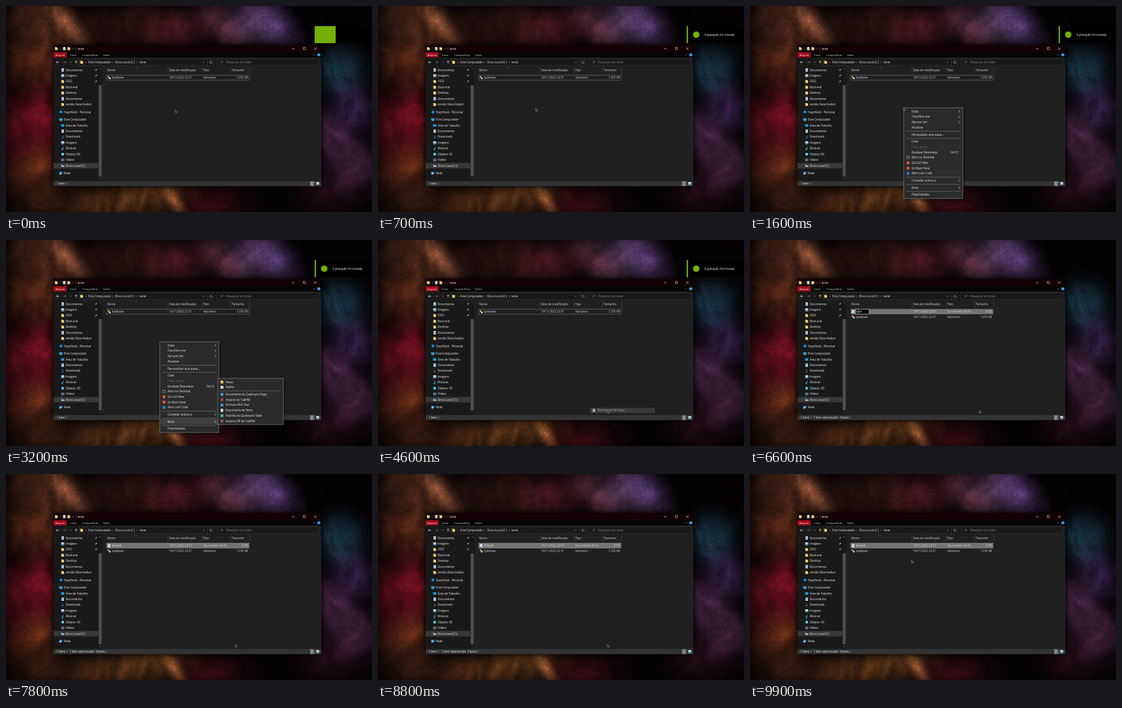
Write an HTML page with a canvas that moves like this. It is 600 px wide and 338 px high and loops after 10 s.

```html
<!DOCTYPE html>
<html lang="pt-BR">
<head>
<meta charset="utf-8">
<style>
html, body { margin: 0; width: 100%; height: 100%; overflow: hidden; background: #000; }
canvas { display: block; }
</style>
</head>
<body>
<canvas id="stage" width="600" height="338"></canvas>
<script>
const W = 600, H = 338, LOOP = 10000;
const stage = document.getElementById('stage').getContext('2d');
let g = stage;

// ---------- drawing helpers ----------
function rect(x, y, w, h, color) {
  g.fillStyle = color;
  g.fillRect(x, y, w, h);
}
function frame(x, y, w, h, color, line = 0.6) {
  g.strokeStyle = color;
  g.lineWidth = line;
  g.strokeRect(x, y, w, h);
}
function disc(x, y, r, color) {
  g.fillStyle = color;
  g.beginPath();
  g.arc(x, y, r, 0, 7);
  g.fill();
}
function path(points, color, line = 0.6) {
  g.strokeStyle = color;
  g.lineWidth = line;
  g.beginPath();
  points.forEach(([x, y]) => g.lineTo(x, y));
  g.stroke();
}
// Large font scaled down keeps letter spacing fractional.
function text(s, x, y, color = '#f2f2f2', align = 'left', size = 4.6) {
  g.save();
  g.translate(x, y + 1.6);
  g.scale(0.1, 0.1);
  g.font = `${size * 10}px "Open Sans", "Noto Sans", sans-serif`;
  g.textAlign = align;
  g.fillStyle = color;
  g.fillText(s, 0, 0);
  g.restore();
}
function chevron(x, y, dir, color = '#bbb', s = 1.6) {
  const turn = { right: 0, down: 1, left: 2, up: 3 }[dir] * Math.PI / 2;
  g.save();
  g.translate(x, y);
  g.rotate(turn);
  path([[-s / 2, -s], [s / 2, 0], [-s / 2, s]], color, 0.6);
  g.restore();
}
function arrow(x, y, dir, color) {
  const turn = { right: 0, left: Math.PI, up: -Math.PI / 2, down: Math.PI / 2 }[dir];
  g.save();
  g.translate(x, y);
  g.rotate(turn);
  path([[-2.3, 0], [2.3, 0]], color, 0.7);
  path([[0.4, -1.9], [2.3, 0], [0.4, 1.9]], color, 0.7);
  g.restore();
}

const square = color => (x, y) => rect(x - 2.2, y - 2.2, 4.4, 4.4, color);
const icons = {
  folder(x, y) {
    rect(x - 2.2, y - 2.6, 2.4, 2, '#e0a93a');
    rect(x - 2.2, y - 1.9, 4.4, 4.3, '#f8d272');
  },
  doc(x, y) {
    rect(x - 2, y - 2.6, 4, 5.2, '#e8eaec');
    [-1, 0.2, 1.4].forEach(d => rect(x - 1.2, y + d, 2.4, 0.4, '#7b8894'));
  },
  page(x, y) {
    icons.doc(x, y);
    rect(x - 1.2, y - 1, 2.4, 2, '#4b9fdc');
  },
  picture(x, y) {
    rect(x - 2.4, y - 2.2, 4.8, 4.4, '#e3eef5');
    rect(x - 1.8, y, 3.6, 1.6, '#2f8fc5');
  },
  computer(x, y) {
    rect(x - 2.7, y - 2.2, 5.4, 3.5, '#35a7e8');
    rect(x - 1.5, y + 1.8, 3, 0.7, '#b8c6d0');
  },
  desk(x, y) { rect(x - 2.5, y - 2, 5, 4, '#1f9ee6'); },
  download(x, y) { arrow(x, y, 'down', '#31aef2'); },
  music(x, y) {
    disc(x - 0.8, y + 1.5, 1.2, '#31aef2');
    path([[x + 0.2, y + 1.5], [x + 0.2, y - 2.4], [x + 1.8, y - 1]], '#31aef2', 0.8);
  },
  cube(x, y) {
    rect(x - 2.1, y - 2.1, 4.2, 4.2, '#35b8d8');
    rect(x - 0.9, y - 0.9, 1.8, 1.8, '#b4ecf5');
  },
  video(x, y) {
    rect(x - 2.4, y - 2, 4.8, 4, '#8d99a8');
    rect(x - 1.4, y - 1.5, 2.8, 3, '#3c5b8c');
  },
  drive(x, y) {
    rect(x - 2.5, y - 0.3, 5.2, 2.1, '#c8ced4');
    rect(x - 2.5, y - 2.1, 2.2, 1.6, '#31aef2');
  },
  network(x, y) {
    rect(x - 2.5, y - 2, 4.8, 3.4, '#3aa4e0');
    disc(x - 1, y + 1.2, 1.3, '#9bd4f5');
  },
  shortcut(x, y) {
    rect(x - 2.3, y - 2.3, 4.6, 4.6, '#f0f0f0');
    path([[x - 1, y + 1.2], [x + 1.1, y - 1]], '#1c6fc4', 0.9);
  },
  program(x, y) {
    rect(x - 2, y - 2.5, 2.2, 2.6, '#e9c83f');
    rect(x - 0.2, y - 0.1, 2.8, 2.4, '#dfe5ea');
  },
  terminal(x, y) {
    rect(x - 2.4, y - 2, 4.8, 4, '#d8d8d8');
    rect(x - 2, y - 1.2, 4, 2.8, '#222');
  },
  orange: square('#e8603c'),
  blue: square('#1f8ad2'),
  navy: square('#4d9be0'),
  green: square('#54b4c8'),
  plum: square('#a2554e'),
  cloud(x, y) { disc(x, y, 2.4, '#1685dc'); }
};

// ---------- wallpaper ----------
// x, y, radius x, radius y, tilt, colour
const clouds = [
  [60, 35, 110, 75, 0.8, '#4c2716'], [98, 25, 75, 24, 0.9, '#5c3826'],
  [45, 95, 75, 60, 0.4, '#552412'], [65, 185, 60, 75, 0, '#760f1c'],
  [15, 200, 60, 90, 0, '#400912'], [55, 265, 80, 55, -0.4, '#5c2813'],
  [90, 325, 110, 45, 0, '#40200f'], [215, 315, 120, 50, -0.2, '#5f3717'],
  [275, 318, 45, 16, 1, '#6a4222'], [335, 325, 90, 45, 0, '#340a10'],
  [190, 35, 120, 60, 0, '#2c130e'], [285, 35, 100, 60, 0, '#3a121a'],
  [358, 35, 70, 38, 0.8, '#532d3c'], [400, 25, 75, 45, 0.8, '#46304c'],
  [442, 30, 70, 42, 0.9, '#563a74'], [545, 105, 60, 60, 0, '#15384a'],
  [570, 165, 50, 65, -0.6, '#35204c'], [535, 215, 55, 70, -0.5, '#4a2546'],
  [575, 265, 60, 60, 0.7, '#40203a'], [530, 305, 75, 50, 0, '#260c18']
];
const hash = (x, y) => {
  const v = Math.sin(x * 127.1 + y * 311.7) * 43758.5453;
  return v - Math.floor(v);
};
function noise(x, y) {
  const i = Math.floor(x), j = Math.floor(y);
  const smooth = v => v * v * (3 - 2 * v);
  const u = smooth(x - i), v = smooth(y - j);
  const mix = (a, b, k) => a + (b - a) * k;
  return mix(mix(hash(i, j), hash(i + 1, j), u), mix(hash(i, j + 1), hash(i + 1, j + 1), u), v);
}
// Warped noise whose creases look like wisps of gas.
function wisps(x, y) {
  const bend = noise(x / 50, y / 50) * 60;
  const crease = 1 - Math.abs(2 * noise((x + bend) / 26, (y - bend) / 45) - 1);
  return crease * 0.5 + noise((x + bend) / 14, y / 20) * 0.3 + noise(x / 6, y / 6) * 0.2;
}
function makeWallpaper() {
  const canvas = document.createElement('canvas');
  canvas.width = W;
  canvas.height = H;
  const c = canvas.getContext('2d');
  c.fillStyle = '#040203';
  c.fillRect(0, 0, W, H);
  c.globalCompositeOperation = 'lighter';
  for (const [x, y, rx, ry, tilt, color] of clouds) {
    const fade = c.createRadialGradient(0, 0, 0, 0, 0, 1);
    fade.addColorStop(0, color);
    fade.addColorStop(0.4, color + '90');
    fade.addColorStop(0.7, color + '34');
    fade.addColorStop(1, color + '00');
    c.save();
    c.translate(x, y);
    c.rotate(tilt);
    c.scale(rx, ry);
    c.fillStyle = fade;
    c.fillRect(-1, -1, 2, 2);
    c.restore();
  }
  const image = c.getImageData(0, 0, W, H), d = image.data;
  for (let p = 0; p < W * H; p++) {
    const x = p % W, y = Math.floor(p / W);
    const grain = hash(x + 0.5, y + 0.3);
    const gain = (0.4 + 0.85 * wisps(x, y)) * (0.9 + 0.2 * grain) + (grain > 0.97 ? 0.5 : 0);
    for (let k = 0; k < 3; k++) d[p * 4 + k] *= gain;
  }
  c.putImageData(image, 0, 0);
  return canvas;
}

// ---------- file window ----------
const tree = [
  ['page', 'Documentos'], ['picture', 'Imagens'], ['folder', '2022'], ['folder', 'Back end'],
  ['folder', 'Desktop'], ['page', 'Documentos'], ['folder', 'versão Data Analyst']
];
const places = [
  ['desk', 'Área de Trabalho'], ['page', 'Documentos'], ['download', 'Downloads'], ['picture', 'Imagens'],
  ['music', 'Músicas'], ['cube', 'Objetos 3D'], ['video', 'Vídeos'], ['drive', 'Disco Local (C:)']
];
function treeItem(icon, label, x, y) {
  icons[icon](x, y);
  text(label, x + 5, y);
}
function drawWindow() {
  g.shadowColor = '#000';
  g.shadowBlur = 7;
  rect(78, 64, 439, 231.5, '#202020');
  g.shadowBlur = 0;

  rect(78, 64, 439, 12, '#130205');
  icons.folder(82.5, 70);
  rect(88.6, 67.5, 0.5, 5, '#777');
  icons.doc(95.5, 70);
  icons.folder(103, 70);
  chevron(110, 70, 'down', '#ddd', 0.9);
  rect(114.6, 67.5, 0.5, 5, '#999');
  text('teste', 117.5, 70);
  rect(469, 69.7, 4, 0.6, '#ddd');
  frame(487.3, 68, 3.6, 3.6, '#ddd');
  path([[505.2, 68], [509.2, 72]], '#ddd');
  path([[509.2, 68], [505.2, 72]], '#ddd');

  rect(78, 76, 439, 8.5, '#050505');
  rect(78, 76, 21.5, 8.5, '#a40d1e');
  text('Arquivo', 88.7, 80, '#fff', 'center', 4.2);
  text('Início', 105, 80, '#ddd', 'left', 4.2);
  text('Compartilhar', 125, 80, '#ddd', 'left', 4.2);
  text('Exibir', 159.5, 80, '#ddd', 'left', 4.2);
  chevron(504.8, 80, 'down', '#aaa', 1.4);
  disc(512.9, 80, 2.6, '#1795e0');
  text('?', 512.9, 80, '#fff', 'center', 4.3);

  rect(78, 84.5, 439, 15, '#191919');
  arrow(85, 92.3, 'left', '#eee');
  arrow(96, 92.3, 'right', '#777');
  chevron(106, 92.3, 'down', '#aaa', 1.2);
  arrow(115, 92.3, 'up', '#eee');
  frame(120, 86.5, 221, 11.5, '#484848', 0.5);
  icons.folder(124, 92.3);
  chevron(131, 92.3, 'right', '#ccc', 1.2);
  text('Este Computador', 135, 92.3);
  chevron(175, 92.3, 'right', '#ccc', 1.2);
  text('Disco Local (C:)', 179, 92.3);
  chevron(215.3, 92.3, 'right', '#ccc', 1.2);
  text('teste', 219, 92.3);
  chevron(324, 92.3, 'down', '#bbb', 1.4);
  rect(330, 87, 0.5, 11, '#484848');
  g.strokeStyle = '#ccc';
  g.lineWidth = 0.6;
  g.beginPath();
  g.arc(336, 92.3, 1.9, -0.4, 5.2);
  g.stroke();
  frame(346, 86.5, 167, 11.5, '#484848', 0.5);
  g.beginPath();
  g.arc(354.3, 91.6, 1.4, 0, 7);
  g.strokeStyle = '#999';
  g.stroke();
  path([[353.3, 92.6], [351.8, 94.2]], '#999');
  text('Pesquisar em teste', 361, 92.3, '#888');

  rect(78, 99.5, 73.5, 188, '#191919');
  rect(78, 257.5, 73.5, 9, '#383838');
  tree.forEach(([icon, label], i) => {
    const y = 105 + i * 9.43;
    treeItem(icon, label, 93, y);
    if (i < 3) {
      path([[145.8, y + 1.7], [147.2, y + 0.2]], '#aaa', 0.5);
      path([[146.6, y - 0.6], [148, y + 0.9]], '#bbb', 0.7);
      path([[147.4, y], [148.8, y - 1.4]], '#bbb', 1.3);
    }
  });
  treeItem('cloud', 'HazyNook - Personal', 90, 174);
  treeItem('computer', 'Este Computador', 90, 186.5);
  places.forEach(([icon, label], i) => treeItem(icon, label, 93, 196 + i * 9.43));
  treeItem('network', 'Rede', 90, 274.2);
  rect(151.5, 99.5, 6, 188, '#171717');
  rect(151.8, 130, 5.2, 149.5, '#4d4d4d');
  chevron(154.4, 103, 'up', '#aaa', 1.2);
  chevron(154.4, 283, 'down', '#aaa', 1.2);

  ['Nome', 'Data de modificação', 'Tipo', 'Tamanho'].forEach((label, i) =>
    text(label, [166, 267.5, 323.5, 370.5][i], 105.6, '#dedede'));
  [265, 321, 368, 399].forEach(x => rect(x, 100.5, 0.6, 10.5, '#555'));
  chevron(213.5, 101.4, 'up', '#999', 1.3);

  rect(78, 287.3, 439, 8.2, '#333');
  rect(498, 287.3, 7.5, 8.2, '#686868');
  [289.3, 291.2, 293.1].forEach(y => rect(500.3, y, 2.4, 0.7, '#fff'));
  icons.picture(511, 291.3);
}

// ---------- files ----------
const CREATED = 5000, FIRST_KEY = 6500, COMMIT = 7700;
function fileRow(y, icon, name, date, type, size) {
  icons[icon](169, y);
  if (name) text(name, 174, y);
  text(date, 267.5, y, '#d2d2d2');
  text(type, 323.5, y, '#d2d2d2');
  text(size, 396.5, y, '#d2d2d2', 'right');
}
function drawRename(t) {
  const typed = 'lista'.slice(0, Math.max(0, Math.floor((t - FIRST_KEY) / 100) + 1));
  const stem = typed || 'Novo Documento de Texto';
  g.font = '46px "Open Sans", "Noto Sans", sans-serif';
  const stemWidth = g.measureText(stem).width / 10;
  const boxWidth = g.measureText(stem + '.txt').width / 10 + 13;
  rect(173, 113.5, boxWidth, 8, '#000');
  frame(173, 113.5, boxWidth, 8, '#eee', 0.6);
  if (!typed) rect(174.3, 114.2, stemWidth, 6.8, '#0078d7');
  text(stem + '.txt', 174.3, 117.6, '#fff');
  const caretOff = t >= 7100 && t < 7400;
  if (typed && !caretOff) rect(174.5 + stemWidth, 114.5, 0.5, 6, '#fff');
}
function drawFiles(t) {
  const created = t >= CREATED;
  if (created) {
    rect(165, 113.2, 233.5, 8.6, '#747474');
    fileRow(117.6, 'doc', t >= COMMIT ? 'lista.txt' : '', '18/11/2022 22:03', 'Documento de Te...', '0 KB');
    if (t < COMMIT) drawRename(t);
    else frame(165, 113.2, 233.5, 8.6, '#8a8a8a', 0.5);
  } else {
    frame(165.2, 113.4, 233.6, 8.4, '#777', 0.6);
  }
  fileRow(created ? 126.2 : 117.6, 'program', 'tysdl.exe', '18/11/2022 22:31', 'Aplicativo', '7.250 KB');
  text(created ? '2 itens' : '1 item', 83, 291.3);
  rect(99.6, 289, 0.5, 4.5, '#999');
  if (created) {
    text('1 item selecionado  0 bytes', 104, 291.3);
    rect(164.3, 289, 0.5, 4.5, '#999');
  }
}

// ---------- menus ----------
const MENU_OPEN = 1100, SUB_OPEN = 2700, MENU_CLOSE = 4600;
// y, label, icon, flag: > submenu, - disabled
const mainMenu = [
  [173, 'Exibir', '', '>'], [181.8, 'Classificar por', '', '>'], [190.5, 'Agrupar por', '', '>'],
  [199.3, 'Atualizar'], [211, 'Personalizar esta pasta...'], [222.6, 'Colar'],
  [231.4, 'Colar atalho', '', '-'], [240, 'Desfazer Renomear'], [248.7, 'Abrir no Terminal', 'terminal'],
  [257.4, 'Git GUI Here', 'orange'], [266.1, 'Git Bash Here', 'orange'], [274.8, 'Abrir com Code', 'blue'],
  [286.4, 'Conceder acesso a', '', '>'], [298, 'Novo', '', '>'], [309.8, 'Propriedades']
];
const newMenu = [
  [233, 'Pasta', 'folder'], [241.7, 'Atalho', 'shortcut'], [253.3, 'Documento do Quelmarix Page', 'navy'],
  [262, 'Arquivo do TukPAK', 'plum'], [270.8, 'Formato Rich Text', 'navy'], [279.6, 'Documento de Texto', 'doc'],
  [288.3, 'Planilha do Quelmarix Table', 'green'], [297, 'Arquivo ZIP do TukPAK', 'plum']
];
function drawMenu(x, y, w, h, items, lines, isHot) {
  g.shadowColor = '#000a';
  g.shadowBlur = 4;
  g.shadowOffsetX = g.shadowOffsetY = 1.5;
  rect(x, y, w, h, '#2b2b2b');
  g.shadowColor = 'transparent';
  g.shadowBlur = g.shadowOffsetX = g.shadowOffsetY = 0;
  frame(x, y, w, h, '#969696', 0.6);
  lines.forEach(v => rect(x + 4, v, w - 8, 0.6, '#7d7d7d'));
  items.forEach(([v, label, icon, flag]) => {
    if (isHot(v, label)) rect(x + 1.2, v - 4.3, w - 2.4, 8.6, '#414141');
    if (icon) icons[icon](x + 7, v);
    text(label, x + 13, v, flag === '-' ? '#666' : '#f2f2f2');
    if (flag === '>') chevron(x + 91, v, 'right', '#ddd', 2);
  });
}
function drawMenus(t, [cx, cy]) {
  const sub = t >= SUB_OPEN;
  const under = v => Math.abs(v - cy) < 4.35;
  if (t >= MENU_OPEN && t < MENU_CLOSE) {
    drawMenu(252, 167, 97, 149, mainMenu, [205.2, 216.8, 280.6, 292.2, 303.8],
      (v, label) => sub ? label === 'Novo' : under(v));
    text('Ctrl+Z', 341.5, 240, '#f2f2f2', 'right');
    if (sub) drawMenu(347, 227, 107.5, 76, newMenu, [247.3], v => cx > 347.5 && under(v));
  } else if (t >= MENU_CLOSE && t < MENU_CLOSE + 100) {
    rect(348, 275.3, 106, 8.6, '#3a3a3a');
    g.globalAlpha = 0.65;
    icons.doc(354, 279.6);
    text('Documento de Texto', 360, 279.6);
    g.globalAlpha = 1;
  }
}

// ---------- pointer ----------
const route = [
  [0, 277.5, 170.3], [300, 277.5, 170.3], [900, 252, 166.8], [1700, 252, 166.8], [2300, 293, 302],
  [2600, 293, 302], [3100, 346.5, 299], [3500, 346.5, 299], [4200, 376, 279.3],
  [9500, 376, 279.3], [9900, 264.7, 141.3]
];
function pointerAt(t) {
  const i = route.findIndex(stop => stop[0] > t);
  if (i < 0) return route[route.length - 1].slice(1);
  const [t0, x0, y0] = route[i - 1], [t1, x1, y1] = route[i];
  const k = (t - t0) / (t1 - t0), e = k * k * (3 - 2 * k);
  return [x0 + (x1 - x0) * e, y0 + (y1 - y0) * e];
}
function drawPointer([x, y]) {
  const shape = [[0, 0], [0, 4.4], [1.1, 3.6], [1.8, 5.1], [2.5, 4.8], [1.8, 3.3], [3.2, 3.2]];
  g.beginPath();
  shape.forEach(([dx, dy]) => g.lineTo(x + dx, y + dy));
  g.closePath();
  g.fillStyle = '#000';
  g.fill();
  g.strokeStyle = '#c4c4c4';
  g.lineWidth = 0.5;
  g.stroke();
}

// ---------- recording notice ----------
function drawNotice(t) {
  if (t >= 6100) return;
  const left = t >= 6000 ? 560 : 506;
  let bar = 2.2;
  if (t < 200) bar = t < 100 ? 34.5 : 12;
  if (t >= 5700) bar = t < 5800 ? 8 : t < 5900 ? 40 : 94;
  rect(left, 33, W - left, 28, '#000');
  rect(left, 33, bar, 28, '#74b004');
  if (t < 5600) {
    g.globalAlpha = Math.min(1, Math.max(0, (t - 200) / 300));
    disc(521.7, 47, 5.3, '#74b004');
    text('A gravação foi iniciada', 535, 47, '#fff', 'left', 4.75);
    g.globalAlpha = 1;
  }
}

// ---------- loop ----------
const backdrop = makeWallpaper();
g = backdrop.getContext('2d');
g.globalCompositeOperation = 'source-over';
drawWindow();
g = stage;

function draw(now) {
  const t = Math.floor(now % LOOP / 100) * 100;
  const pointer = pointerAt(t);
  g.drawImage(backdrop, 0, 0);
  drawFiles(t);
  drawNotice(t);
  drawMenus(t, pointer);
  drawPointer(pointer);
}
const start = performance.now();
function tick() {
  draw(performance.now() - start);
  requestAnimationFrame(tick);
}
tick();
</script>
</body>
</html>
```
